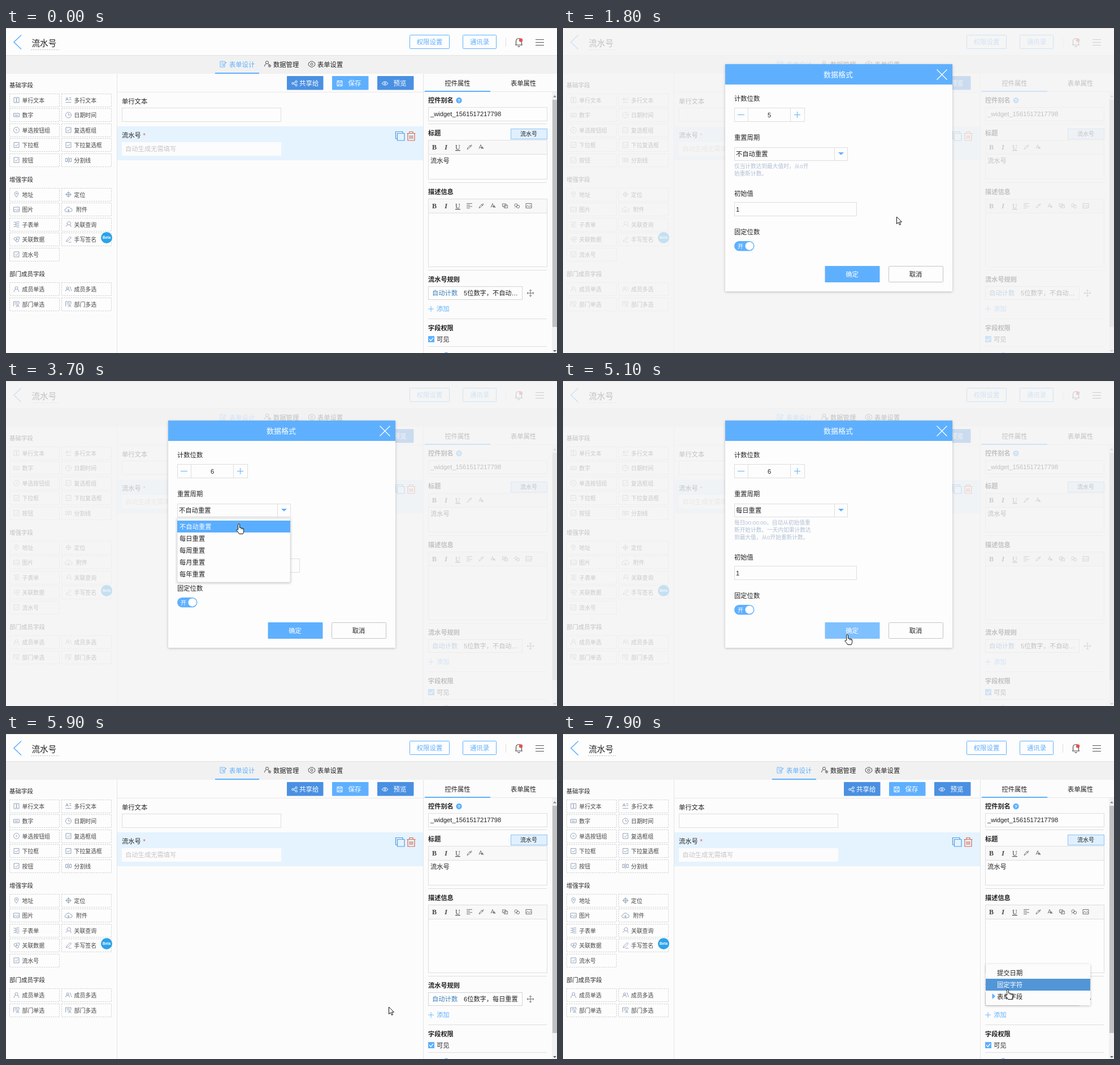
An HTML page for the animation above (8000 ms loop, 975 by 575 pixels).

```html
<!DOCTYPE html>
<html lang="zh-CN">
<head>
<meta charset="utf-8">
<title>流水号</title>
<style>
html, body { margin: 0; width: 100%; height: 100%; overflow: hidden; background: #fcfcfc; }
svg { display: block; width: 975px; height: 575px; }
text { font-family: "Liberation Sans", "Noto Sans CJK SC", "Noto Sans CJK", "Noto Sans CJK JP", sans-serif; white-space: pre; }
.serif { font-family: "Liberation Serif", serif; }
.mid { text-anchor: middle; }
.b { font-weight: bold; }
.pop { filter: drop-shadow(0 1px 2px rgba(0,0,0,.24)); }
</style>
</head>
<body>
<svg id="stage" viewBox="0 0 975 575"></svg>
<script>
const BLUE = '#5eb0ff', DEEP = '#4a90e2', INK = '#222', LINE = '#dedede', SLATE = '#8799b3';
const LOOP = 8000, STEP = 100;

// ---- drawing helpers ----
const T = (x, y, size, str, fill = INK, more = '') =>
  `<text x="${x}" y="${y + size * 0.38}" font-size="${size}" fill="${fill}" ${more}>${str}</text>`;
const R = (x, y, w, h, fill, stroke = 'none', more = '') =>
  `<rect x="${x}" y="${y}" width="${w}" height="${h}" fill="${fill}" stroke="${stroke}" ${more}/>`;
const box = (x, y, w, h, fill = '#fdfdfd', stroke = LINE, more = '') => R(x + .5, y + .5, w - 1, h - 1, fill, stroke, more);
const P = (d, stroke, width = 1, fill = 'none', more = '') =>
  `<path d="${d}" stroke="${stroke}" stroke-width="${width}" fill="${fill}" ${more}/>`;
const G = (id, body) => `<g id="${id}">${body}</g>`;
const rule = (x, y, w, c = LINE) => R(x, y, w, 1, c);
const ring = (r, x = 0, y = 0) => `M${x - r} ${y}a${r} ${r} 0 1 0 ${2 * r} 0a${r} ${r} 0 1 0 ${-2 * r} 0`;
const MID = 'class="mid"', BOLD = 'class="b"';

const ICONS = {
  text: 'M-4.5-4.5h9v9h-9zM-1.5-2.5h3M0-2.5v5M-1.5 2.5h3',
  lines: 'M-5 1l2.5-5.5 2.5 5.5M-4-1h3M1.5-4h3.5M1.5-1h3.5M-5 4h10',
  keys: 'M-5-3h10v6h-10zM-3-1h1m1 0h1m1 0h1M-3 1h6',
  clock: ring(5) + 'M0-3v3h3',
  radio: ring(5) + ring(1),
  check: 'M-4.5-4.5h9v9h-9zM-2.5 0l2 2 3.5-4',
  split: 'M-5-3h3v6h-3zM2-3h3v6h-3zM0-5v10',
  pin: 'M0 5C-5-1-3.5-5 0-5S5-1 0 5z' + ring(1, 0, -1.5),
  aim: ring(3.5) + 'M-5.5 0h11M0-5.5v11',
  image: 'M-5-4h10v8h-10zM-5 2.5l3-3 3 2.5 2-2 2 2M1.5-1.5h1',
  cloud: 'M-3.5 4a2.6 2.6 0 0 1-.5-5.2a4 4 0 0 1 7.6-.6a2.9 2.9 0 0 1 .2 5.8zM0 5v-5m-2 2l2-2 2 2',
  sub: 'M-5-4h3M-5 0h3M-5 4h3M0-4.5h5M0-1.5h5M0 1.5h5M0 4.5h5M-1-4.5v9',
  find: ring(3, 1, -2) + 'M3 .5l2 4M-1 .5l-4 3M-4-2l1 1',
  link: ring(2.5, -2, -1) + ring(2.5, 1.5, 2) + 'M0-4h5v4',
  pen: 'M-4 4l1-3 6-6 2 2-6 6zM0 5h5',
  man: ring(2.5, 0, -2) + 'M-4.5 5q0-4 3-4.8M4.5 5q0-4-3-4.8',
  men: ring(2, -1.5, -2) + 'M-5 4q0-4 3.5-4t3.5 4M2-4q3 0 1.5 3.5q2 1 2 4',
  dept: 'M-5 4v-8.5h9.5v4M-3-2h5M-3 .5h2' + ring(1.6, 2, 1.5) + 'M-1 5q3-3.5 6 0',
  form: 'M3 1v4h-8v-10h8v2M-3-2h4M-3 1h3M0 3l1-2.5 4-4.5 1 1-4 4.5z',
  gear: 'M-2-5h4l1 1.6 2 .4L6 0 5 3l-2 .4L2 5h-4l-1-1.6-2-.4L-6 0l1-3 2-.4z' + ring(2),
  share: ring(1.7, -3, 0) + ring(1.7, 3, -3) + ring(1.7, 3, 3) + 'M-1.5-.7L1.5-2.3M-1.5.7L1.5 2.3',
  save: 'M-4.5-4.5h9v9h-9zM-2.5-4.5v3h5v-3M-2.5 4.5v-3h5v3',
  eye: 'M-5.5 0Q0-6.5 5.5 0Q0 6.5-5.5 0z' + ring(1.6),
  dropper: 'M-4 4l1-2.5 4-4 1.5 1.5-4 4zM0-3l3 3M1.5-1.8l1.8-2 1 1-2 1.8',
  font: 'M-4 3l3-7 3 7M-3 .8h4M0 3.5l2-4 2 4M1 2.2h2',
  align: 'M-5-4h10M-5-1.3h6M-5 1.3h10M-5 4h6',
  chain: 'M-4.5-3.5h6v5h-6zM-1.5-1.2h6v5h-6z',
  unchain: ring(2.6, -1.5, -1) + ring(2.6, 2, 1.5) + 'M-4 4l1-1',
  move: 'M-6 0h12M0-6v12M-4-2l-2 2 2 2M4-2l2 2-2 2M-2-4l2-2 2 2M-2 4l2 2 2-2',
  plus: 'M-5 0h10M0-5v10'
};
const icon = (name, x, y, c = SLATE, w = .9) => P(ICONS[name], c, w, 'none', `transform="translate(${x} ${y})"`);

// ---- page ----
function header() {
  const btn = (x, w, s) => box(x, 12, w, 25, 'none', BLUE, 'rx="1"') + T(x + w / 2, 25, 11.4, s, BLUE, MID);
  return R(0, 0, 975, 48, '#fdfdfd') + rule(0, 0, 975, '#e4e4e4') +
    P('M27 12.5L14 25l13 12.5', BLUE, 1.6) + T(45.5, 26, 14.6, '流水号') +
    P('M44 38.5h50', '#c4c4c4', 1, 'none', 'stroke-dasharray="2.5 1.5"') +
    btn(714, 71, '权限设置') + btn(808, 60, '通讯录') + R(884, 17, 1, 16, LINE) +
    P('M901 30h13M902.5 30v-6q0-5.5 5-5.5t5 5.5v6M905.5 32.2q2 1.6 4 0', '#444', 1.1) +
    `<circle cx="911" cy="21.5" r="3.2" fill="#e2534b"/>` +
    P('M937 20.5h15M937 25.5h15M937 30.5h15', '#555') +
    R(0, 48, 975, 33, '#f1f1f1') + rule(0, 48, 975, '#e2e2e2') +
    icon('form', 384, 64, BLUE) + T(395, 64.5, 11.3, '表单设计', BLUE) + R(370, 79, 78, 2, BLUE) +
    icon('man', 462, 63, '#444') + P(ring(2, 466.5, 67), '#444', .9) + T(473, 64.5, 11.3, '数据管理') +
    icon('gear', 541, 64, '#444') + T(551, 64.5, 11.3, '表单设置');
}

function palette() {
  const group = (title, y, items) => T(6, y, 10.5, title) + items.map(([ic, s], i) => {
    const x = i % 2 ? 98 : 6, cy = y + 26.5 + 26.5 * (i >> 1);
    return box(x, Math.round(cy - 12), 89, 24, '#fdfdfd', '#d2d2d2', 'stroke-dasharray="2.5 1.5"') +
      icon(ic, x + 12.5, cy) + T(x + (ic === 'cloud' ? 26 : 22.5), cy + .5, 9.9, s, '#444');
  }).join('');
  return R(196, 81, 1, 494, '#e4e4e4') +
    group('基础字段', 101, [['text', '单行文本'], ['lines', '多行文本'], ['keys', '数字'], ['clock', '日期时间'],
      ['radio', '单选按钮组'], ['check', '复选框组'], ['check', '下拉框'], ['check', '下拉复选框'], ['check', '按钮'], ['split', '分割线']]) +
    group('增强字段', 268, [['pin', '地址'], ['aim', '定位'], ['image', '图片'], ['cloud', '附件'], ['sub', '子表单'],
      ['find', '关联查询'], ['link', '关联数据'], ['pen', '手写签名'], ['check', '流水号']]) +
    group('部门成员字段', 435.5, [['man', '成员单选'], ['men', '成员多选'], ['dept', '部门单选'], ['dept', '部门多选']]) +
    `<circle cx="178" cy="371" r="10" fill="#2aa3ea"/>` + T(178, 371, 6.5, 'Beta', '#fff', 'class="mid b"');
}

function canvas() {
  const btn = (x, c, ic, s, tx) => R(x, 85, 64.5, 24.5, c, 'none', 'rx="1"') + icon(ic, x + 13.5, 98, '#fff', 1) + T(tx, 98, 11.5, s, '#fff');
  return btn(497, DEEP, 'share', '共享给', 519) + btn(577, BLUE, 'save', '保存', 605.5) + btn(657, DEEP, 'eye', '预览', 685.5) +
    rule(197, 113, 541, '#e8e8e8') + T(205, 129.5, 11.3, '单行文本', INK, 'font-weight="500"') + box(205, 141, 282, 25) +
    R(197, 174, 541, 60, '#e5f3ff') + T(205, 190, 11.3, '流水号', INK, 'font-weight="500"') + T(242.5, 190, 11.3, '*', '#e2534b') +
    R(205, 202, 282, 24, '#fcfcfc') + T(211, 214, 11.3, '自动生成无需填写', '#c6c6c6') +
    P('M692.5 196h-3v-12.5h12.5v3M692.5 186.5h12.5v12.5h-12.5z', '#4a9de8', 1.2) +
    P('M709.5 186.5h15M714 186v-2.5h6v2.5M711 187v12h12v-12M714.5 190v6M717 190v6M719.5 190v6', '#d9694f', 1.2);
}

function panel() {
  const bar = (y, rest) => ['B', 'I', 'U'].map((s, i) => T(758 + 20.7 * i, y, 12, s, '#444',
      `class="serif mid b" ${i === 1 ? 'font-style="italic"' : i === 2 ? 'style="font-weight:normal;text-decoration:underline"' : ''}`)).join('') +
    rest.map((n, i) => icon(n, 820 + 21 * i, y, '#666')).join('');
  const editor = (y, h, icons) => box(747, y, 211, h) + R(748, y + 1, 209, 24, '#f8f8f8') +
    rule(747, y + 25, 210) + bar(y + 12.5, icons);
  const head = (y, s) => T(747, y, 11.2, s, INK, BOLD);
  const help = (x, y) => `<circle cx="${x}" cy="${y}" r="5.2" fill="${BLUE}"/>` + T(x, y, 8, '?', '#fff', 'class="mid b"');
  return R(738, 81, 1, 494, '#e4e4e4') + rule(739, 112, 236, '#e6e6e6') + R(741, 111, 116, 2, BLUE) +
    T(799, 97.5, 11.3, '控件属性', INK, MID) + T(915.5, 97.5, 11.3, '表单属性', INK, MID) +
    R(966, 113, 9, 462, '#f1f1f1') + R(967, 127, 8, 402, '#c1c1c1') +
    P('M968 122.5l3-3.5 3 3.5z', 'none', 0, '#888') + P('M968 570l3 3 3-3z', 'none', 0, '#555') +
    head(128, '控件别名') + help(801.5, 128) + box(747, 140, 211, 25) + T(751, 152, 11.15, '_widget_1561517217798') +
    rule(747, 169, 210) + head(186, '标题') + box(893, 178, 65, 19, '#dff0ff', '#8fc2f2') + T(925, 187.5, 10, '流水号', INK, MID) +
    editor(198, 70, ['dropper', 'font']) + T(751, 235, 11.3, '流水号') +
    rule(747, 273, 210) + head(290, '描述信息') +
    editor(302, 121, ['align', 'dropper', 'font', 'chain', 'unchain', 'image']) +
    rule(747, 428, 210) + head(445, '流水号规则') +
    box(747, 457, 167, 24, '#fdfdfd', '#d4d4d4', 'id="ruleBox"') + T(754, 469, 11.3, '自动计数', '#3f80bd') +
    T(810, 469, 11.2, '', INK, 'id="ruleText"') + G('gear', icon('gear', 898, 469, BLUE)) +
    icon('move', 928, 469, '#666') + icon('plus', 752, 497, BLUE) + T(762, 497, 11.3, '添加', BLUE) +
    rule(747, 514, 210) + head(531, '字段权限') + R(747, 545, 11, 11, BLUE) + P('M749 550.5l2.7 2.7 4.3-5', '#fff', 1.3) +
    T(762, 551, 11.3, '可见') + rule(747, 563, 210) + help(779, 579);
}

// ---- overlays ----
const CYCLES = ['不自动重置', '每日重置', '每周重置', '每月重置', '每年重置'];
const ENTRIES = ['提交日期', '固定字符', '表单字段'];
const rows = (id, names, x, y, w, tx) => names.map((s, i) =>
  R(x, y + 21 * i, w, 21, 'none', 'none', `id="${id}R${i}"`) + T(tx, y + 10.5 + 21 * i, 11.3, s, INK, `id="${id}T${i}"`)).join('');

function modal() {
  const note = (id, lines) => G(id, lines.map((s, i) => T(303, 250.5 + 12.8 * i, 9.7, s, '#b0bfd4')).join(''));
  return R(287, 70, 402, 402, '#fdfdfd', 'none', 'class="pop"') + R(287, 70, 402, 36, BLUE) +
    T(487, 88.5, 13, '数据格式', '#fff', MID) + P('M661.5 79.5l18 18M679.5 79.5l-18 18', '#fff', 1.3) +
    T(303, 130.5, 11.3, '计数位数') + box(303, 147, 125, 25) + R(327, 147, 1, 25, LINE) + R(402, 147, 1, 25, LINE) +
    P('M309 159.5h12M409 159.5h11M414.5 154v11', BLUE) + T(365, 159.5, 11.2, '5', INK, 'id="digits" class="mid"') +
    T(303, 200, 11.3, '重置周期') + box(303, 217, 201, 24) + R(480, 217, 1, 24, LINE) +
    P('M487 226h10l-5 4.8z', 'none', 0, BLUE) + T(306, 228.5, 11.3, '', INK, 'id="cycle"') +
    note('noteA', ['仅当计数达到最大值时，从0开', '始重新计数。']) +
    note('noteB', ['每日00:00:00，自动从初始值重', '新开始计数。一天内如果计数达', '到最大值，从0开始重新计数。']) +
    G('lower', T(303, 298.5, 11.3, '初始值') + box(303, 314, 217, 25) + T(306, 326.5, 11.2, '1') +
      T(303, 367, 11.3, '固定位数') + R(303, 383, 35.5, 17.5, BLUE, 'none', 'rx="8.75"') +
      T(309, 391.7, 10, '开', '#fff') + '<circle cx="329.8" cy="391.7" r="7.3" fill="#fff"/>') +
    R(463.5, 427, 97, 29, BLUE, 'none', 'id="ok" rx="1"') + T(511.5, 441.5, 11.3, '确定', '#fff', MID) +
    box(576, 427, 97, 29, '#fdfdfd', '#c4c4c4', 'rx="1"') + T(624, 441.5, 11.3, '取消', INK, MID) +
    G('list', R(303, 243, 200, 113, '#fdfdfd', '#e2e2e2', 'class="pop"') + rows('list', CYCLES, 303, 247, 200, 307));
}

const $ = id => document.getElementById(id);
$('stage').innerHTML = R(0, 0, 975, 575, '#fcfcfc') + header() + palette() + canvas() + panel() +
  G('menu', R(748, 407, 185, 73, '#fcfcfc', 'none', 'class="pop"') + rows('menu', ENTRIES, 748, 412, 185, 768) +
    P('M759.5 459l5.5 5-5.5 5z', 'none', 0, BLUE)) +
  G('veil', R(0, 1, 975, 574, '#f3f3f3', 'none', 'opacity=".76"') + G('modal', modal())) +
  P('M0 0v12.5l3-2.7 2 4.6 2-.9-2-4.4h4z', '#111', 1, '#fff', 'id="arrow"') +
  P('M-1.3 10V1.2a1.4 1.4 0 0 1 2.8 0V6.5q2.2-.8 2.8.6 2.1-.6 2.6.8 1.8-.3 1.8 1.6v3.2q0 2-1.5 4.8h-6.5q-1.2-2.6-4.8-6.3 0-2 1.6-1.2zM4.2 7v2.5M6.8 8v2', '#111', 1, '#fff', 'id="hand"');

// ---- motion ----
// pointer stops: time, x, y
const STOPS = [
  [100, 964.5, 361], [300, 964.5, 361], [600, 928, 430], [800, 890, 498], [900, 882, 508],
  [1200, 898.5, 474], [1500, 901.5, 464], [1600, 901.5, 464], [1800, 590.5, 334], [2000, 590.5, 334],
  [2100, 513, 291], [2300, 462, 180], [2400, 436, 161], [2500, 415, 165], [2800, 415, 165],
  [3200, 418, 230], [3300, 418, 234], [3600, 418, 234], [3700, 412, 253], [3800, 412, 253],
  [4000, 406, 278], [4100, 398, 285], [4300, 398, 285], [4500, 431, 305], [4700, 551, 405],
  [4800, 580, 452], [5000, 503, 449], [5800, 503, 449], [5900, 677.5, 483], [6100, 780, 502],
  [6300, 780, 502], [6400, 778, 498], [6600, 778, 497], [6700, 778, 494], [7200, 778, 494],
  [7400, 779, 487], [7500, 779, 487], [7900, 787, 452]
];
// spans in which the pointer is a hand
const HANDS = [[2500, 4100], [4800, 5200], [6100, LOOP]];
// dialog: time, opacity, offset
const VEIL = [[1600, 0, -32], [1700, .5, -22], [1800, 1, -6], [1900, 1, 0], [5100, 1, 0], [5200, .75, -4], [5400, .25, -16], [5500, 0, -22]];

// piecewise linear value of column k at time t
function at(keys, t, k) {
  const i = keys.findIndex(s => s[0] > t);
  if (i < 0) return keys[keys.length - 1][k];
  if (i === 0) return keys[0][k];
  const a = keys[i - 1], b = keys[i];
  return a[k] + (b[k] - a[k]) * (t - a[0]) / (b[0] - a[0]);
}

const show = (id, on) => $(id).style.display = on ? '' : 'none';
const set = (id, key, v) => $(id).setAttribute(key, v);
function pick(id, n, row, color) {
  for (let i = 0; i < n; i++) {
    set(id + 'R' + i, 'fill', i === row ? color : 'none');
    set(id + 'T' + i, 'fill', i === row ? '#fff' : INK);
  }
}

function draw(time) {
  const t = Math.floor(time / STEP) * STEP;
  const x = at(STOPS, t, 1), y = at(STOPS, t, 2);
  const hand = HANDS.some(([a, b]) => t >= a && t < b);
  show('arrow', t >= 100 && !hand);
  show('hand', hand);
  for (const id of ['arrow', 'hand']) set(id, 'transform', `translate(${x} ${y})`);

  const hover = t >= 1100 && t < 1700;
  set('ruleBox', 'fill', hover ? '#ebebeb' : '#fdfdfd');
  show('gear', hover);
  $('ruleText').textContent = t >= 5200 ? '6位数字，每日重置' : hover ? '5位数字，不…' : '5位数字，不自动…';

  const alpha = at(VEIL, t, 1), daily = t >= 4100;
  show('veil', alpha > 0);
  set('veil', 'opacity', alpha);
  set('modal', 'transform', `translate(0 ${at(VEIL, t, 2)})`);
  $('digits').textContent = t >= 2600 ? '6' : '5';
  $('cycle').textContent = CYCLES[daily ? 1 : 0];
  show('noteA', !daily);
  show('noteB', daily);
  set('lower', 'transform', `translate(0 ${daily ? 13 : 0})`);
  set('ok', 'fill', t > 4800 && x < 560 ? '#7fc0ff' : BLUE);
  show('list', t >= 3200 && t < 4100);
  pick('list', 5, y < 268 ? 0 : 1, '#5aaeff');

  show('menu', t >= 6400);
  set('menu', 'opacity', t < 6500 ? .5 : 1);
  pick('menu', 3, y < 475 ? Math.floor((y - 412) / 21) : -1, '#5296d8');
}

function tick() {
  draw(performance.now() % LOOP);
  requestAnimationFrame(tick);
}
tick();
</script>
</body>
</html>
```
